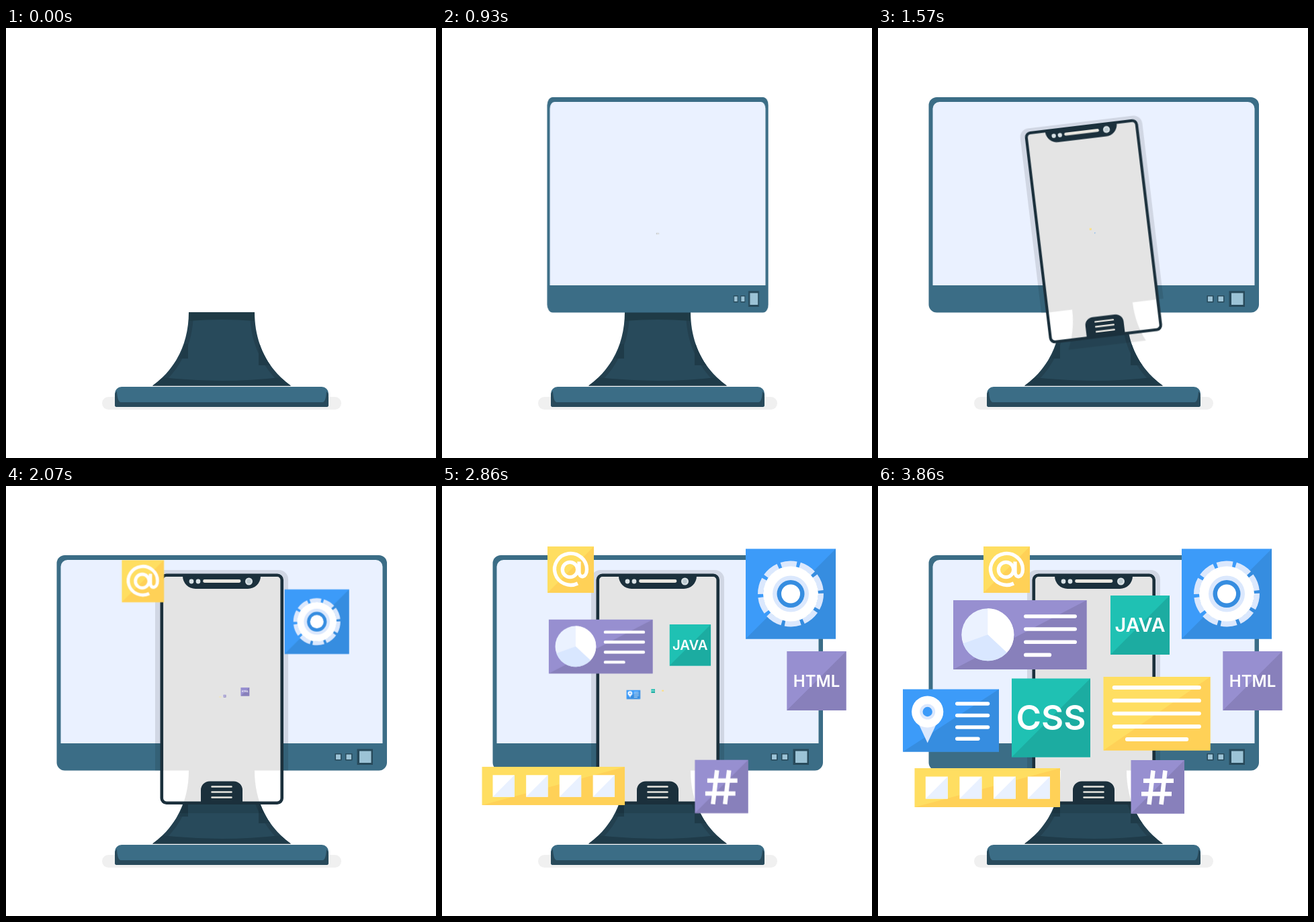
Animation of 640 by 640 pixels, one loop 5.43 s. Source, as an HTML page:

```html
<!DOCTYPE html>
<html lang="en">
<head>
<meta charset="utf-8">
<title>Web development</title>
<style>
html, body { margin: 0; width: 100%; height: 100%; overflow: hidden; background: #fff; }
svg { display: block; width: 100%; height: 100%; }

.monitor { transform-origin: 321px 263px; animation: widen 1200ms cubic-bezier(.94, 0, .65, 1) both paused; }
.phone, .card { animation: pop 1200ms cubic-bezier(.87, 0, .14, 1) var(--t) both paused; }
.phone { --t: 750ms; transform-origin: 321px 306px; animation-name: spin; }
.card { transform-origin: var(--o, 321px 306px); }
@keyframes widen { from { transform: scaleX(0); } }
@keyframes spin { from { transform: rotate(-90deg) scale(0); } }
@keyframes pop { from { transform: scale(0); } }

.yellow { fill: #ffde61; } .yellow .lo { fill: #ffd157; }
.blue { fill: #3c9bf9; } .blue .lo { fill: #368de0; }
.purple { fill: #978fd0; } .purple .lo { fill: #8880bb; }
.teal { fill: #1fc1b3; } .teal .lo { fill: #1caca1; }
.white { fill: #fff; }
.pale { fill: #dbe8fd; }
.line { fill: none; stroke: #fff; stroke-linecap: round; }
text { fill: #fff; font-family: Inter, "Open Sans", sans-serif; font-weight: 600; text-anchor: middle; }
</style>
</head>
<body>
<svg viewBox="0 0 640 640">
  <defs>
    <path id="neck" d="M272 423H370C370 470 390 508 424 532.5H218C252 508 272 470 272 423Z"/>
    <clipPath id="neckClip"><use href="#neck"/></clipPath>
    <g id="tile">
      <path class="white" d="M0 0H33V33H0Z"/>
      <path fill="#e9f1ff" d="M33 0V33H0Z"/>
    </g>
  </defs>

  <!-- stand -->
  <rect x="143" y="549" width="356" height="19" rx="9.5" fill="#f0f0f0"/>
  <use href="#neck" fill="#284a5b"/>
  <g clip-path="url(#neckClip)">
    <use href="#neck" fill="none" stroke="#000" stroke-opacity=".13" stroke-width="14"/>
    <path fill="#1f3b46" d="M272 423H370V436Q321 432 272 436Z"/>
    <path fill="#1f3b49" d="M210 533L234 520Q321 530 408 520L430 533Z"/>
    <path fill="#1f3b49" d="M271 470V492H258L266 470ZM376 470V502H394L384 474Z"/>
  </g>
  <path fill="#3b6d86" d="M162 544a10 10 0 0 1 10-10H470a10 10 0 0 1 10 10V561a3 3 0 0 1-3 3H165a3 3 0 0 1-3-3Z"/>
  <path fill="#284a5b" d="M162 546Q163 541 165 541Q166 557 171 557H471Q476 557 477 541Q479 542 480 546V561a3 3 0 0 1-3 3H165a3 3 0 0 1-3-3Z"/>

  <g class="monitor">
    <rect x="75.5" y="103" width="491.5" height="320.5" rx="12" fill="#3b6d86"/>
    <path fill="#eaf1ff" d="M81.5 383V120a10 10 0 0 1 10-10H550.5a10 10 0 0 1 10 10V383Z"/>
    <path fill="#284a5b" d="M489.5 398H499.5V408.5H489.5ZM505 398H515.5V408.5H505ZM522.5 391.5H546V415H522.5Z"/>
    <path fill="#9cc3d6" d="M491 399.5H498V407H491ZM506.5 399.5H514V407H506.5ZM526 394.5H543.5V412H526Z"/>
  </g>

  <g class="phone">
    <rect x="232" y="133" width="178.5" height="338.5" rx="7" fill="#fff"/>
    <path fill-opacity=".107" d="M222 423.5V139a14 14 0 0 1 14-14H406a14 14 0 0 1 14 14V423.5H370C370 447 375 468 384 487H258C267 468 272 447 272 423.5Z"/>
    <rect x="231.8" y="132.8" width="178.9" height="338.9" rx="7" fill="none" stroke="#1b303c" stroke-width="4.6"/>
    <path fill="#1b303c" d="M263 132V134a19 19 0 0 0 19 19H360a19 19 0 0 0 19-19V132ZM290 472V452.5a13 13 0 0 1 13-13H339a13 13 0 0 1 13 13V472Z"/>
    <g fill="#d9e2e6">
      <circle cx="276" cy="142" r="3.4"/>
      <circle cx="286" cy="142" r="3.4"/>
      <circle cx="361.5" cy="142" r="5.5"/>
    </g>
    <circle cx="361.5" cy="142" r="3.2" fill="#bccad0"/>
    <path fill="none" stroke="#e8e6df" stroke-linecap="round" stroke-width="4.8" d="M295.5 141.5H347"/>
    <path fill="none" stroke="#e8e6df" stroke-linecap="round" stroke-width="2.6" d="M306.5 447.5H335.5M306.5 455.5H335.5M306.5 463.5H335.5"/>
  </g>

  <!-- at sign -->
  <g class="card yellow" style="--t:1278ms">
    <path d="M157 90H226V159H157Z"/><path class="lo" d="M226 90V159H157Z"/>
    <g class="line" stroke-width="5.3" style="stroke-linecap:butt">
      <circle cx="190.5" cy="124.5" r="11.2"/>
      <path d="M204 112.5V128C204 138 215.5 137 215.5 124A24 23.5 0 1 0 202 145"/>
    </g>
  </g>

  <!-- gear -->
  <g class="card blue" style="--t:1419ms">
    <path d="M452 93.5H586V227.5H452Z"/><path class="lo" d="M586 93.5V227.5H452Z"/>
    <circle cx="519" cy="160.5" r="44.8" fill="none" stroke="#dbe8fd" stroke-width="8.4" stroke-dasharray="23.15 5" transform="rotate(-.8 519 160.5)"/>
    <circle class="white" cx="519" cy="160.5" r="41"/>
    <circle class="pale" cx="519" cy="160.5" r="27"/>
    <circle class="lo" cx="519" cy="160.5" r="20.5"/>
    <circle class="white" cx="519" cy="160.5" r="14"/>
  </g>

  <g class="card purple" style="--t:1597ms;--o:321px 309px">
    <path d="M513.3 246H601.5V334H513.3Z"/><path class="lo" d="M601.5 246V334H513.3Z"/>
    <text x="557.5" y="298.5" font-size="24">HTML</text>
  </g>

  <!-- hash -->
  <g class="card purple" style="--t:1753ms">
    <path d="M376.5 408H456V487.5H376.5Z"/><path class="lo" d="M456 408V487.5H376.5Z"/>
    <path class="line" stroke-width="6.6" style="stroke-linecap:butt" d="M409.5 423.5L403.5 474M427.5 423.5L421.5 474M395 438.8H440M392 458.2H437"/>
  </g>

  <!-- four tiles -->
  <g class="card yellow" style="--t:1874ms;--o:321px 312px">
    <path d="M54.5 420H271V478H54.5Z"/><path class="lo" d="M271 420V478H54.5Z"/>
    <use href="#tile" x="70.8" y="432.5"/>
    <use href="#tile" x="121.4" y="432.5"/>
    <use href="#tile" x="172" y="432.5"/>
    <use href="#tile" x="222.8" y="432.5"/>
  </g>

  <!-- pie chart -->
  <g class="card purple" style="--t:2177ms;--o:324px 300px">
    <path d="M112 170H310.5V273H112Z"/><path class="lo" d="M310.5 170V273H112Z"/>
    <circle cx="163.3" cy="221.3" r="39" fill="#ebf2ff"/>
    <path class="white" d="M163.3 221.3V182.3A39 39 0 0 1 191.8 247.9Z"/>
    <path fill="#d9e7ff" d="M163.3 221.3L191.8 247.9A39 39 0 0 1 126.7 234.6Z"/>
    <path class="line" stroke-width="5.6" d="M219.8 194H293.2M219.8 213H293.2M219.8 232.3H293.2M219.8 251.4H255.4"/>
  </g>

  <g class="card teal" style="--t:2210ms">
    <path d="M346 163H434V251H346Z"/><path class="lo" d="M434 163V251H346Z"/>
    <text x="390" y="217" font-size="29">JAVA</text>
  </g>

  <!-- map pin -->
  <g class="card blue" style="--t:2387ms;--o:314px 304px">
    <path d="M37 302.5H180V395.5H37Z"/><path class="lo" d="M180 302.5V395.5H37Z"/>
    <path class="pale" d="M59.5 352H88L73.7 382.5Z"/>
    <circle class="white" cx="73.7" cy="336" r="23.6"/>
    <circle class="pale" cx="73.7" cy="336" r="11.5"/>
    <circle cx="73.7" cy="336" r="7.2"/>
    <path class="line" stroke-width="5.4" d="M117.7 324H163.6M117.7 341.5H163.6M117.7 359H163.6M117.7 376.3H149"/>
  </g>

  <g class="card teal" style="--t:2531ms;--o:317px 303px">
    <path d="M199 286.5H316V403.5H199Z"/><path class="lo" d="M316 286.5V403.5H199Z"/>
    <text x="257.5" y="363.3" font-size="51">CSS</text>
  </g>

  <!-- text block -->
  <g class="card yellow" style="--t:2650ms;--o:327px 304px">
    <path d="M335.5 284H494.5V393.5H335.5Z"/><path class="lo" d="M494.5 284V393.5H335.5Z"/>
    <path class="line" stroke-width="5.8" d="M351.6 300H478M351.6 319.4H478M351.6 338.6H478M351.6 358H478M370.8 377H459.3"/>
  </g>
</svg>
<script>
// Steps the CSS animations at 14 pictures a second, then rests until the loop restarts.
const LOOP = 5430, STEP = 1000 / 14, LAST = 54;
const anims = document.getAnimations();

function tick() {
  const t = performance.now() % LOOP;
  const step = Math.min(LAST, Math.floor((t + 5) / STEP));
  for (const a of anims) a.currentTime = step * STEP;
  requestAnimationFrame(tick);
}
tick();
</script>
</body>
</html>
```
